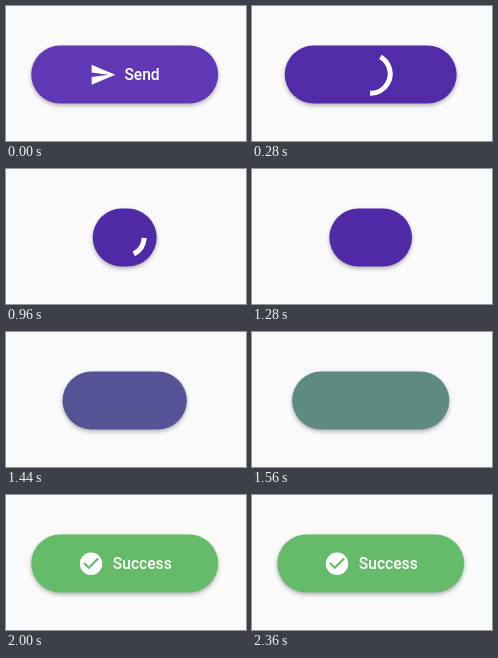
Animation of 240 by 135 pixels, one loop 2400 ms. Source, as an HTML page with a canvas:

```html
<!DOCTYPE html>
<html lang="en">
<head>
<meta charset="utf-8">
<title>Send button</title>
<style>
  html, body { margin: 0; width: 100%; height: 100%; overflow: hidden; background: #fafafa; }
  canvas { display: block; width: 100vw; height: 100vh; }
</style>
</head>
<body>
<canvas id="stage"></canvas>
<script>
const WIDTH = 240, HEIGHT = 135, LOOP = 2400;
const CENTER = { x: 118.7, y: 68.5 };
const BUTTON = { full: 187, small: 64, height: 58 };
const IDLE = [96, 55, 181], BUSY = [80, 41, 167], DONE = [102, 187, 106];
const ICON_SCALE = 1.12;

const sendIcon = new Path2D("M2.01 21L23 12 2.01 3 2 10l15 2-15 2z");
const checkIcon = new Path2D(
  "M12 2a10 10 0 1 0 0 20a10 10 0 1 0 0-20z" +
  "M10 17l-5-5 1.41-1.41L10 14.17l7.59-7.59L19 8z");

const canvas = document.getElementById("stage");
const ctx = canvas.getContext("2d");

const progress = (t, from, to) => Math.min(1, Math.max(0, (t - from) / (to - from)));
const ease = (t, from, to) => {
  const p = progress(t, from, to);
  return p * p * (3 - 2 * p);
};
const mix = (a, b, p) => a + (b - a) * p;
const mixColor = (a, b, p) => a.map((value, i) => mix(value, b[i], p));

function resize() {
  const ratio = window.devicePixelRatio || 1;
  canvas.width = Math.round(innerWidth * ratio);
  canvas.height = Math.round(innerHeight * ratio);
}

function drawButton(t, scale) {
  const shrink = ease(t, 140, 785) - ease(t, 1122, 1768);
  const width = mix(BUTTON.full, BUTTON.small, shrink);
  const busy = mixColor(IDLE, BUSY, progress(t, 0, 320));
  const color = mixColor(busy, DONE, ease(t, 1280, 1740));

  ctx.save();
  ctx.shadowColor = "rgba(0, 0, 0, 0.3)";
  ctx.shadowBlur = 4 * scale;
  ctx.shadowOffsetY = 2 * scale;
  ctx.fillStyle = `rgb(${color.map(Math.round).join(",")})`;
  ctx.beginPath();
  ctx.roundRect(CENTER.x - width / 2, CENTER.y - BUTTON.height / 2,
    width, BUTTON.height, BUTTON.height / 2);
  ctx.fill();
  ctx.restore();
}

function drawLabel(icon, iconX, text, textX, alpha) {
  if (alpha <= 0) return;
  ctx.save();
  ctx.globalAlpha = alpha;
  ctx.fillStyle = "#fff";
  ctx.font = "500 15.6px Roboto, sans-serif";
  ctx.fillText(text, textX, 74.3);
  ctx.translate(iconX, 55.3);
  ctx.scale(ICON_SCALE, ICON_SCALE);
  ctx.fill(icon, "evenodd");
  ctx.restore();
}

// The head runs ahead for half a cycle, then the tail catches up while all rotates.
function drawSpinner(t) {
  const sweep = 302;
  const turn = 14 + 0.265 * (t - 560);
  const tail = turn + sweep * ease(t, 560, 1120);
  const head = turn + sweep * ease(t, 0, 560);
  const alpha = progress(t, 100, 260);
  if (alpha <= 0 || head - tail < 0.1) return;

  ctx.save();
  ctx.globalAlpha = alpha;
  ctx.strokeStyle = "#fff";
  ctx.lineWidth = 5;
  ctx.beginPath();
  ctx.arc(CENTER.x, 67.8, 19.5, tail * Math.PI / 180, head * Math.PI / 180);
  ctx.stroke();
  ctx.restore();
}

function draw(now) {
  const t = now % LOOP;
  const scale = canvas.width / WIDTH;
  ctx.setTransform(scale, 0, 0, canvas.height / HEIGHT, 0, 0);
  ctx.fillStyle = "#fafafa";
  ctx.fillRect(0, 0, WIDTH, HEIGHT);

  drawButton(t, scale);
  drawLabel(sendIcon, 83.4, "Send", 118.4, 1 - progress(t, 40, 220));
  drawSpinner(t);
  drawLabel(checkIcon, 71.6, "Success", 106.8, progress(t, 1680, 1960));
}

const start = performance.now();
function tick() {
  draw(performance.now() - start);
  requestAnimationFrame(tick);
}

addEventListener("resize", resize);
resize();
tick();
</script>
</body>
</html>
```
